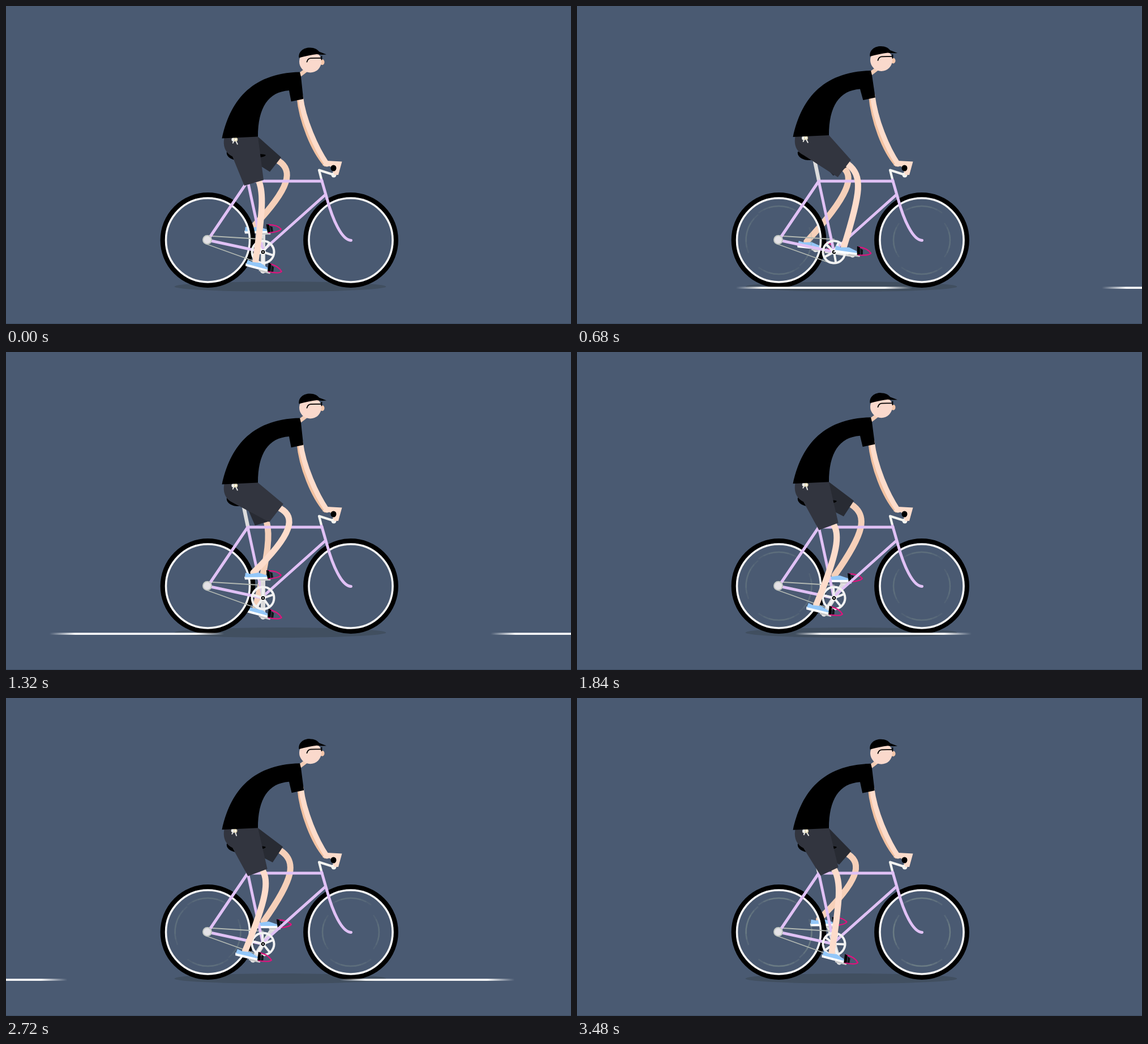
An HTML page for the animation above (3.52 s loop, 998x561 px).

```html
<!DOCTYPE html>
<html lang="en">
<head>
<meta charset="utf-8">
<title>Cyclist</title>
<style>
  html, body { margin: 0; width: 100%; height: 100%; overflow: hidden; background: #4a5a72; }
  svg { display: block; width: 100vw; height: 100vh; }
  .line { fill: none; stroke-linecap: round; stroke-linejoin: round; }
  .skin { stroke: #fddccb; }
  .shade { stroke: #f6d0b9; }
  .frame { stroke: #e0c1f5; stroke-width: 5; }
  .chain { stroke: #b2b8b2; stroke-width: 1.8; }
  .steel { stroke: #dcdcdc; }
  .glint { fill: none; stroke: #93a39c; stroke-width: 2.6; stroke-opacity: .17; }
</style>
</head>
<body>
<svg viewBox="0 0 998 561">
  <defs>
    <linearGradient id="fade">
      <stop offset="0" stop-color="#fff" stop-opacity="0"/>
      <stop offset=".15" stop-color="#fff"/>
      <stop offset=".84" stop-color="#fff"/>
      <stop offset="1" stop-color="#fff" stop-opacity="0"/>
    </linearGradient>
    <g id="wheel" fill="none">
      <circle r="79.7" stroke="#000" stroke-width="8.4"/>
      <circle r="74" stroke="#f5f5f5" stroke-width="3.6"/>
    </g>
    <g id="crank">
      <path class="line steel" stroke-width="8" d="M0 0V33"/>
      <circle cy="33" r="5" fill="#e4e4e4"/>
    </g>
    <g id="shoe">
      <path fill="#fff" d="M-33-5H8V0H-32z"/>
      <path fill="#93c7f8" d="M-32-4L-31-12L-22-10L-8-12L7-7V-4z"/>
      <path class="line" stroke="#c9c9c9" stroke-width="3" d="M-6 1H12"/>
      <path class="line" stroke="#e0127d" stroke-width="2.2" d="M9-15Q25-15 32-7Q29-2 10-1"/>
      <path fill="#000" d="M6-16L11-15L13-2L8-1z"/>
      <path fill="#15151b" d="M12-13L17-11L18-3L14-2z"/>
    </g>
  </defs>

  <rect width="998" height="561" fill="#4a5a72"/>
  <rect y="560" width="998" height="1" fill="#3c4b61"/>
  <ellipse cx="484.5" cy="495" rx="187" ry="9" fill="#414f60"/>

  <use id="crankFar" href="#crank"/>
  <path id="legFar" class="line shade" stroke-width="11"/>
  <use id="shoeFar" href="#shoe"/>
  <path id="shortsFar" fill="#282b33"/>

  <g id="glints"></g>
  <use href="#wheel" x="356.5" y="413"/>
  <use href="#wheel" x="609" y="413"/>
  <g id="streaks" fill="url(#fade)"></g>

  <path class="line steel" stroke-width="6.5" d="M418 264L427 307"/>
  <path d="M390 257C388 266 400 273 412 272L436 267Q457 268 459 263Q454 260 440 262Z"/>
  <path class="line chain" d="M356 405.5L454 411.5M354 420L446 453"/>
  <path class="line frame" d="M454 434L427 309L356.5 413L454 434M452 433L564 333M427 309H558"/>
  <circle cx="355.5" cy="412.5" r="7.5" fill="#e4e2e6" stroke="#c3c8c4" stroke-width="2"/>
  <path class="line" stroke="#f4f4f0" stroke-width="4.2" d="M557 305L553 289.5L578 297.5"/>
  <circle cx="579" cy="298" r="4.5" fill="#f4f4f0"/>
  <path class="line frame" d="M557.5 307L567 340C577 377 593 413 609.5 413.5"/>

  <use id="crankNear" href="#crank"/>
  <g id="ring" class="line" stroke="#f2f2f2">
    <circle r="19.5" stroke-width="4"/>
    <g id="spokes" stroke-width="4"></g>
    <circle r="4" fill="#000" stroke-width="1.5"/>
    <circle r="1.2" fill="#fff" stroke="none"/>
  </g>
  <path id="legNear" class="line skin" stroke-width="11"/>
  <use id="shoeNear" href="#shoe"/>
  <path id="shortsNear" fill="#32353f"/>

  <path id="armFar" class="line" stroke="#f2c1a0" stroke-width="8"/>
  <path id="armNear" class="line skin" stroke-width="9"/>
  <path fill="#fddccb" d="M559 281L567 273L593.5 274.5L587 298L580 298L573 283z"/>
  <ellipse cx="578.5" cy="286" rx="5" ry="5.5"/>

  <g id="body">
    <g id="keys" class="line" stroke="#e6e6e2" stroke-width="2">
      <path d="M-1 2L-3 6M2 2L5 8"/>
      <circle cx="-2" r="2.5" fill="#fff"/>
      <circle cx="2" r="2.5" fill="#fff" stroke="#e3d9b5"/>
    </g>
    <path fill="#f3cdb6" d="M517 119L528 111L534 115L521 125z"/>
    <ellipse cx="558.5" cy="99.5" rx="4" ry="5" fill="#f5c7ab"/>
    <circle cx="537.5" cy="98.5" r="19.5" fill="#fad9cc"/>
    <path d="M517.5 92C516 80 527 73.5 537 74C545 74 550 77 553 81L566 86Q556 87 549 85.5Q535 87 517.5 92z"/>
    <path class="line" stroke="#000" stroke-width="1.8" d="M531.5 99Q533 93 538 92.5L557 92M557.5 89V95"/>
  </g>
  <path id="shirt"/>
</svg>
<script>
const STEP = 40, STEPS = 88, TURN = 22;
const PASSES = [9, 17, 24, 31, 39, 47, 55, 63, 71, 79];
const $ = id => document.getElementById(id);
const set = (el, attrs) => { for (const k in attrs) el.setAttribute(k, attrs[k]); };
const add = (parent, tag, attrs) => {
  const el = document.createElementNS('http://www.w3.org/2000/svg', tag);
  set(el, attrs);
  return parent.appendChild(el);
};
const pt = p => p.map(v => v.toFixed(2)).join(' ');

for (let i = 0; i < 5; i++)
  add($('spokes'), 'path', { d: 'M0 4V19', transform: `rotate(${i * 72})` });

// Soft-ended reflections: nested arcs on opposite sides of each wheel
function glint(x, r, turn) {
  for (const span of [74, 54, 34])
    add($('glints'), 'circle', {
      class: 'glint', r, pathLength: 360,
      'stroke-dasharray': `${span} ${180 - span}`, 'stroke-dashoffset': span / 2,
      transform: `translate(${x} 413) rotate(${turn})`
    });
}
glint(356.5, 60, 90);
glint(356.5, 58, 14);
glint(609, 60, 90);
glint(609, 50, 0);

const streaks = PASSES.map(() => add($('streaks'), 'rect', { y: 495.3, height: 3.6 }));

// The leg snaps straight at the bottom of the stroke, so the lift has a cusp there
const swing = (q, low, lift, lead) =>
  low + lift * Math.abs(Math.sin(q / 2)) + lead * Math.sin(q);

function leg(side, q, bob) {
  const far = side === 'Far', cos = Math.cos(q);
  const dx = far ? 4 + 8 * cos : 0, dy = far ? -5 - 4 * cos : 0;
  const knee = [swing(q, 452, 50, -11) + dx, swing(q, 335, -39, 5) + dy];
  const front = [swing(q, 455, 35, -6) + dx, swing(q, 307, -39, 10) + dy];
  let back = [swing(q, 421, 44, -11) + dx, swing(q, 317, -17, 4) + dy];
  if (far) back = back.map((v, i) => v + (front[i] - v) * .2);

  const pedal = [454 - 33 * Math.sin(q), 434 + 33 * cos];
  const tilt = 7 + 8 * cos, f = tilt * Math.PI / 180;
  const ankle = [
    pedal[0] - 17 * Math.cos(f) + 12 * Math.sin(f),
    pedal[1] - 17 * Math.sin(f) - 12 * Math.cos(f)
  ];
  const start = front.map((v, i) => v + (back[i] - v) * .24);
  const bend = knee[0] - start[0];
  const c1 = [knee[0] + bend * .55, knee[1] - 5];
  const c2 = [knee[0] + bend * .35, knee[1] + 24];

  set($('leg' + side), { d: `M${pt(start)}C${pt(c1)} ${pt(c2)} ${pt(ankle)}` });
  set($('shoe' + side), { transform: `translate(${pt(pedal)}) rotate(${tilt})` });
  set($('crank' + side), { transform: `translate(454 434) rotate(${q * 180 / Math.PI})` });
  const hip = 231 + bob;
  const seat = far
    ? `M422 265L430 ${hip}`
    : `M400 ${266 + bob}C388 ${260 + bob} 382 ${248 + bob} 386 ${hip}`;
  set($('shorts' + side), { d: `${seat}L445 ${hip}L${pt(front)}L${pt(back)}Z` });
}

function torso(bob, q) {
  const y = v => v + bob, s = -bob * .6;
  set($('body'), { transform: `translate(0 ${bob})` });
  set($('keys'), { transform: `translate(${404 + bob * .5} 236) rotate(${8 * Math.sin(2 * q)})` });
  set($('shirt'), {
    d: `M381.5 ${y(234)}C395 ${y(172)} 430 ${y(119)} 519 ${y(117)}L521 ${y(125)}
        L${525 + s} ${y(164.5)}L${503.5 + s} ${y(169)}L500 ${y(149.5)}
        C463 ${y(152)} 445 ${y(180)} 445 ${y(231)}Z`
  });
  set($('armFar'), { d: `M${517 + s} ${y(160)}C${521 + s} 204 543 255 564 279` });
  set($('armNear'), { d: `M${520 + s} ${y(160)}C${525 + s} 201 548 251 567 279` });
}

function draw(n) {
  const q = 2 * Math.PI * n / TURN;
  const bob = -.4 - 2.7 * Math.abs(Math.sin(q));
  leg('Far', q + Math.PI, bob);
  leg('Near', q, bob);
  torso(bob, q);
  set($('ring'), { transform: `translate(454 434) rotate(${q * 180 / Math.PI})` });

  const beat = n % 11;
  set($('glints'), { opacity: beat === 0 ? 0 : beat === 10 ? 1 : .65 });

  streaks.forEach((el, i) => {
    const j = n - PASSES[i] + .5;
    const on = Math.abs(j) < 11;
    const x = 333 - 764 * Math.sin(.137 * j);
    const blur = 50 * Math.cos(.137 * j);
    set(el, { x, width: Math.max(0, 262 + blur), visibility: on ? 'visible' : 'hidden' });
  });
}

function tick() {
  draw(Math.floor(performance.now() / STEP) % STEPS);
  requestAnimationFrame(tick);
}
tick();
</script>
</body>
</html>
```
